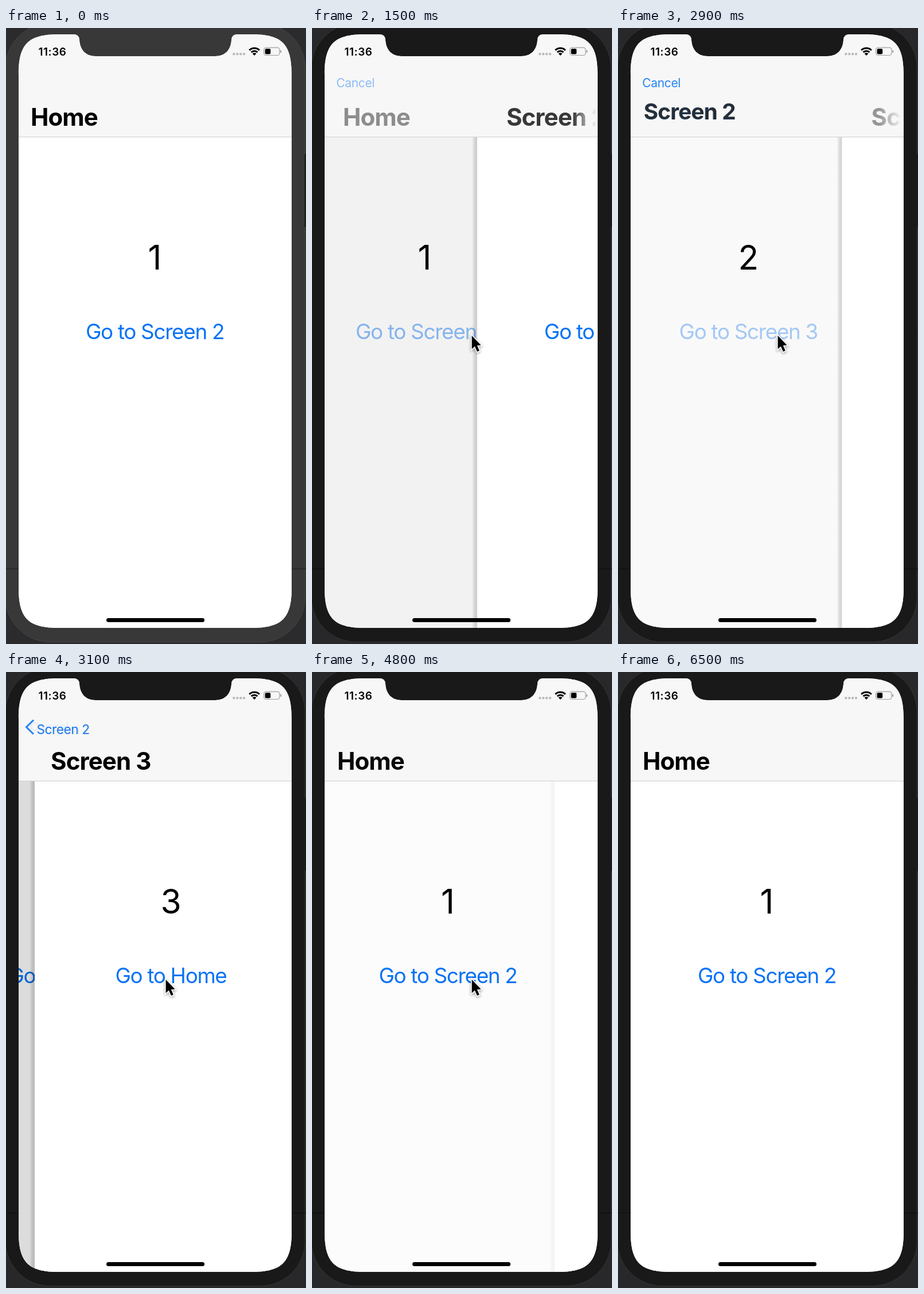
Animation, 523 px wide and 1071 px high, one loop 6.6 s. Source, as an HTML page with a canvas:

```html
<!DOCTYPE html>
<html lang="en">
<head>
<meta charset="utf-8">
<title>Screen navigation</title>
<style>
  html, body { margin: 0; width: 100%; height: 100%; overflow: hidden; background: #2c2c2e; }
  canvas { display: block; width: 523px; height: 1071px; }
</style>
</head>
<body>
<canvas id="stage"></canvas>
<script>
const W = 523, H = 1071, LOOP = 6600, STEP = 100;
const SCREEN = { x: 22, y: 11, w: 476, h: 1032 };
const RIGHT = SCREEN.x + SCREEN.w, BAR = 189, TITLE_X = 43;
const FONT = 'Inter, "Liberation Sans", sans-serif';
const BLUE = '#0873f4', BAR_FILL = '#f7f7f7';

const pages = [
  { title: 'Home', link: 'Go to Screen 2' },
  { title: 'Screen 2', link: 'Go to Screen 3', left: 'Cancel' },
  { title: 'Screen 3', link: 'Go to Home', left: 'Screen 2', back: true }
];

// The header of the last move runs slightly ahead of its content.
const moves = [
  { from: 0, to: 1, press: 1400, header: 1418, body: 1418 },
  { from: 1, to: 2, press: 2800, header: 2851, body: 2851 },
  { from: 2, to: 0, press: 4000, header: 4519, body: 4619 }
];

const canvas = document.getElementById('stage');
const ratio = window.devicePixelRatio || 1;
canvas.width = W * ratio;
canvas.height = H * ratio;
const ctx = canvas.getContext('2d');

const clamp = v => Math.max(0, Math.min(1, v));
const mix = (a, b, k) => a + (b - a) * k;

function spring(ms) {
  if (ms <= 0) return 0;
  const x = ms * 0.01826;
  const p = 1 - Math.exp(-x) * (1 + x);
  return p > 0.997 ? 1 : p;
}

function rounded(x, y, w, h, r, fill) {
  ctx.beginPath();
  ctx.roundRect(x, y, w, h, r);
  if (fill) {
    ctx.fillStyle = fill;
    ctx.fill();
  }
}

function rect(x, y, w, h, fill) {
  ctx.fillStyle = fill;
  ctx.fillRect(x, y, w, h);
}

function label(str, x, y, { size, weight = 400, gap = 0, color = '#000', align = 'left', alpha = 1 }) {
  if (alpha <= 0) return;
  ctx.save();
  ctx.globalAlpha *= alpha;
  ctx.font = `${weight} ${size}px ${FONT}`;
  ctx.letterSpacing = gap + 'px';
  ctx.textAlign = align;
  ctx.fillStyle = color;
  ctx.fillText(str, x, y);
  ctx.restore();
}

function drawBezel(active) {
  rect(0, 0, W, H, active ? '#28282a' : '#2b2b2e');
  rounded(-1, -8, 522.5, 1075.5, 78, active ? '#191919' : '#383838');
  ctx.strokeStyle = active ? '#353537' : '#454547';
  ctx.lineWidth = 1;
  ctx.stroke();
  rect(0, 940, W, 1, active ? '#0d0d0d' : '#1d1d1d');
  rect(520, 219, 3, 127, active ? '#1b1b1c' : '#222');
}

// Screen outline with smooth (continuous-curvature) corners and a notch.
function screenPath() {
  const { x, y } = SCREEN, bottom = y + SCREEN.h;
  const e = 70, c = 16.7;
  ctx.beginPath();
  ctx.moveTo(x, y + e);
  ctx.bezierCurveTo(x, y + c, x + c, y, x + e, y);
  ctx.lineTo(118, y);
  ctx.quadraticCurveTo(127.5, y, 128, 21);
  ctx.bezierCurveTo(129, 38, 139, 49, 156, 49);
  ctx.lineTo(365, 49);
  ctx.bezierCurveTo(382, 49, 392, 38, 393, 21);
  ctx.quadraticCurveTo(393.5, y, 403, y);
  ctx.lineTo(RIGHT - e, y);
  ctx.bezierCurveTo(RIGHT - c, y, RIGHT, y + c, RIGHT, y + e);
  ctx.lineTo(RIGHT, bottom - e);
  ctx.bezierCurveTo(RIGHT, bottom - c, RIGHT - c, bottom, RIGHT - e, bottom);
  ctx.lineTo(x + e, bottom);
  ctx.bezierCurveTo(x + c, bottom, x, bottom - c, x, bottom - e);
  ctx.closePath();
}

function drawStatus() {
  label('11:36', 56.5, 47.5, { size: 18.9, weight: 600, gap: 0.55 });
  ctx.fillStyle = '#bcbcbc';
  for (let i = 0; i < 4; i++) {
    ctx.beginPath();
    ctx.arc(397.3 + i * 5.9, 45.2, 2.2, 0, 7);
    ctx.fill();
  }
  const a = -Math.PI * 0.75, b = -Math.PI * 0.25;
  ctx.strokeStyle = ctx.fillStyle = '#000';
  ctx.lineWidth = 3;
  for (const r of [12.4, 7.6]) {
    ctx.beginPath();
    ctx.arc(433, 47.5, r, a, b);
    ctx.stroke();
  }
  ctx.beginPath();
  ctx.moveTo(433, 48);
  ctx.arc(433, 48, 4.8, a, b);
  ctx.fill();
  rounded(449.6, 34.1, 27.4, 13.4, 4);
  ctx.strokeStyle = '#9c9c9c';
  ctx.lineWidth = 1.2;
  ctx.stroke();
  rounded(478.3, 38.5, 1.8, 4.6, 1, '#9c9c9c');
  rounded(451.6, 36.1, 9.6, 9.4, 2, '#000');
}

function drawPage(i, x, linkAlpha) {
  const mid = 259.5 + x;
  rect(SCREEN.x + x, BAR, SCREEN.w, H - BAR, '#fff');
  label(String(i + 1), mid, 420, { size: 58.5, align: 'center' });
  label(pages[i].link, mid, 541, { size: 36.8, gap: -1.3, color: BLUE, align: 'center', alpha: linkAlpha });
}

function drawLeft(page, alpha) {
  if (!page.left || alpha <= 0) return;
  if (page.back) {
    ctx.save();
    ctx.globalAlpha = alpha;
    ctx.strokeStyle = BLUE;
    ctx.lineWidth = 3;
    ctx.beginPath();
    ctx.moveTo(48, 83.5);
    ctx.lineTo(35.5, 95.7);
    ctx.lineTo(48, 108);
    ctx.stroke();
    ctx.restore();
  }
  label(page.left, page.back ? 54.3 : 42.3, 103, { size: 21, gap: -0.35, color: BLUE, alpha });
}

function drawTitle(page, dx = 0, alpha = 1) {
  label(page.title, TITLE_X + dx, 169.5, { size: 42, weight: 700, gap: -0.9, alpha });
}

// Large title shrinking into the back button's label.
function drawMorph(page, q) {
  const s = 1 - q / 2;
  ctx.save();
  ctx.translate(mix(TITLE_X, 54.3, q), mix(169.5, 103, q));
  ctx.scale(s, s);
  label(page.title, 0, 0, { size: 42, weight: 700, gap: -0.9, alpha: 1 - q });
  label(page.title, 0, 0, { size: 42, gap: -0.7, color: BLUE, alpha: q });
  ctx.restore();
}

function fadeRightEdge() {
  const g = ctx.createLinearGradient(455, 0, 496, 0);
  g.addColorStop(0, 'rgba(247,247,247,0)');
  g.addColorStop(1, BAR_FILL);
  rect(455, 120, RIGHT - 455, 60, g);
}

function drawHeader(move, p) {
  rect(SCREEN.x, SCREEN.y, SCREEN.w, BAR - SCREEN.y, BAR_FILL);
  rect(SCREEN.x, BAR, SCREEN.w, 1, '#cfcfcf');
  const from = pages[move.from], to = pages[move.to];
  if (p === 0 || p === 1) {
    const page = p ? to : from;
    drawLeft(page, 1);
    drawTitle(page);
    return;
  }
  if (move.to < move.from) {
    drawTitle(from, SCREEN.w * p + 30, 1 - p);
    fadeRightEdge();
    drawTitle(to, 25 * (1 - p), p);
    drawLeft(from, clamp(1 - 2.5 * p));
    return;
  }
  drawTitle(to, SCREEN.w * (1 - p) + 30 * clamp(4 * (1 - p)), clamp(1.75 * p));
  fadeRightEdge();
  if (to.back) {
    drawLeft(from, 1 - p ** 1.4);
    drawMorph(from, p ** 1.25);
    drawLeft({ left: ' ', back: true }, clamp(2 * p - 1));
  } else {
    drawTitle(from, 25 * p, clamp(1 - 1.3 * p));
    drawLeft(to, p);
  }
}

function drawBody(move, p, linkAlpha) {
  const popping = move.to < move.from;
  const under = popping ? move.to : move.from;
  const over = popping ? move.from : move.to;
  const cover = popping ? 1 - p : p;
  const alpha = i => i === move.from ? linkAlpha : 1;
  if (cover === 0) return drawPage(under, 0, alpha(under));
  if (cover === 1) return drawPage(over, 0, alpha(over));

  const x = SCREEN.w * (1 - cover), edge = SCREEN.x + x;
  drawPage(under, -0.3 * SCREEN.w * cover, alpha(under));
  rect(SCREEN.x, BAR, x, H - BAR, `rgba(0,0,0,${0.15 * cover ** 1.3})`);
  const shade = popping ? 0.24 * cover : 0.16;
  const g = ctx.createLinearGradient(edge - 9, 0, edge, 0);
  g.addColorStop(0, 'rgba(0,0,0,0)');
  g.addColorStop(0.5, `rgba(0,0,0,${shade * 0.75})`);
  g.addColorStop(1, `rgba(0,0,0,${shade})`);
  rect(edge - 9, BAR, 9, H - BAR, g);
  drawPage(over, x, alpha(over));
}

function drawCursor(t) {
  if (t < 100 || t >= 5800) return;
  const k = 1 - (1 - clamp((t - 100) / 450)) ** 2;
  ctx.save();
  ctx.translate(mix(309, 278.6, k), mix(611, 534.8, k));
  const arrow = new Path2D('M0 0V23.5L5.2 18.8L9.3 28L13.2 26.3L9.2 17.2L16 16.8Z');
  ctx.lineWidth = 3.2;
  ctx.strokeStyle = ctx.fillStyle = '#fff';
  ctx.shadowColor = 'rgba(0,0,0,.4)';
  ctx.shadowBlur = 4 * ratio;
  ctx.shadowOffsetY = 1.5 * ratio;
  ctx.stroke(arrow);
  ctx.shadowColor = 'transparent';
  ctx.fillStyle = '#000';
  ctx.fill(arrow);
  ctx.restore();
}

function draw(t) {
  const move = moves.filter(m => t >= m.press).pop() || moves[0];
  const linkAlpha = t < move.press ? 1 : clamp(0.2 + 0.8 * Math.max(0, t - move.header) / 250);

  ctx.setTransform(ratio, 0, 0, ratio, 0, 0);
  drawBezel(t >= 900);
  ctx.save();
  screenPath();
  ctx.fillStyle = '#fff';
  ctx.fill();
  ctx.clip();
  drawBody(move, spring(t - move.body), linkAlpha);
  drawHeader(move, spring(t - move.header));
  drawStatus();
  rounded(175, 1026, 171, 7, 3.5, '#000');
  ctx.restore();
  drawCursor(t);
}

const start = performance.now();
function tick() {
  const t = (performance.now() - start) % LOOP;
  draw(Math.floor(t / STEP) * STEP);
  requestAnimationFrame(tick);
}
tick();
</script>
</body>
</html>
```
